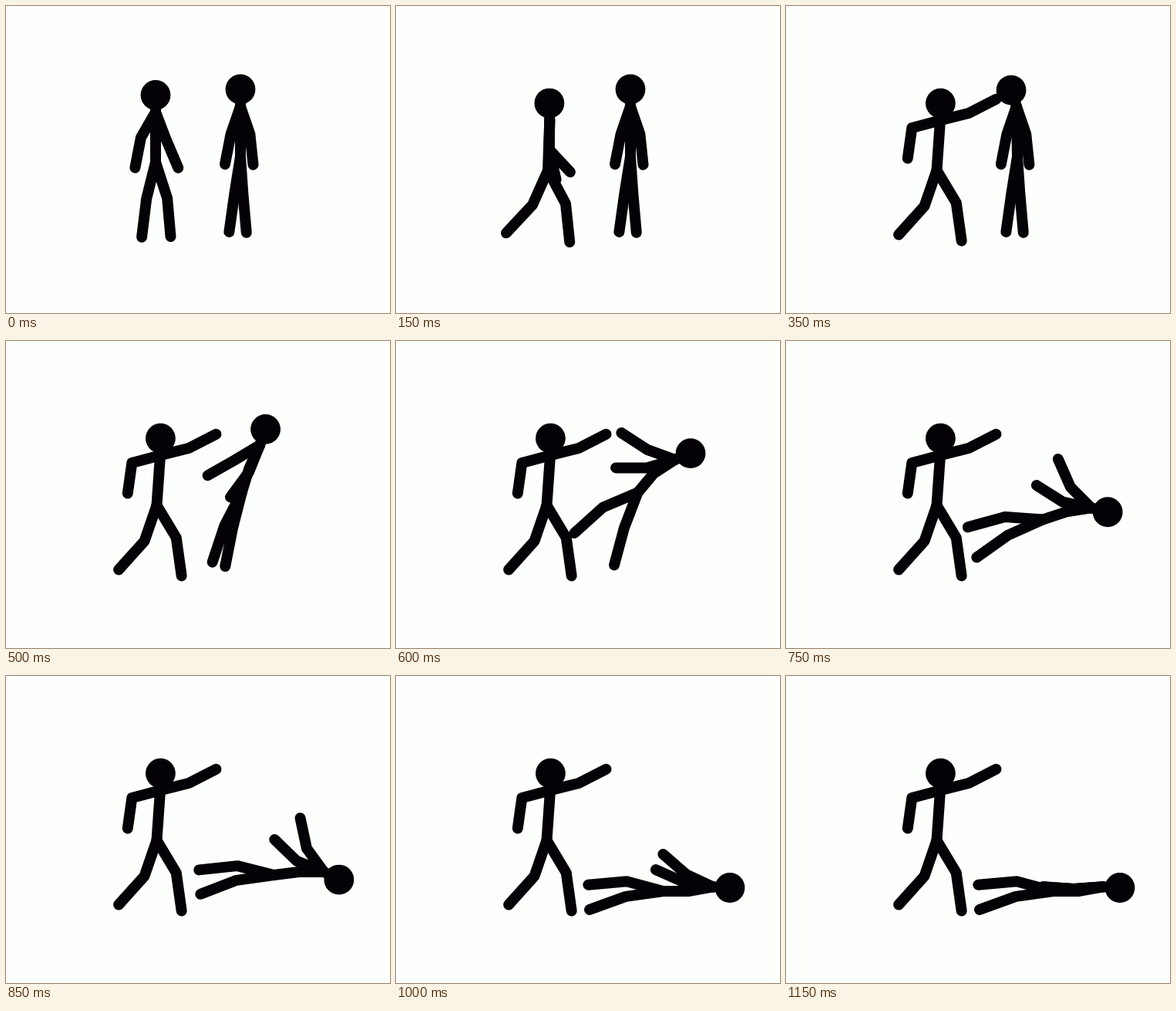
Recreate the animation shown at these times as an HTML page with a canvas. Size 498 by 398 pixels, loop 1200 ms.

```html
<!DOCTYPE html>
<html lang="en">
<head>
<meta charset="utf-8">
<title>Stick fight</title>
<style>
  html, body { margin: 0; width: 100%; height: 100%; overflow: hidden; background: #fdfffc; }
  canvas { display: block; width: 100%; height: 100%; }
</style>
</head>
<body>
<canvas id="stage" width="498" height="398"></canvas>
<script>
const ctx = document.getElementById('stage').getContext('2d');
const PAPER = '#fdfffc', INK = '#040206';
const LOOP = 1200, STEP = 50;
const HEAD = 19.4, LIMB = 14;
const BONES = { spine: [32.5, 32.5, 22], arm: [38, 40], leg: [49, 50] };

// Bone angles are in degrees, clockwise from the right. A key may name only
// some parts; the others keep moving towards their own next key.
const attacker = [
  { t: 0, hip: [194, 202.5], spine: [-90, -90, -90],
    armA: [120, 101], armB: [69, 67], legA: [104, 97], legB: [72, 85] },
  { t: 150, hip: [197, 213], spine: [-88, -88, -91],
    armA: [91, 77], armB: [91, 47], legA: [114, 133], legB: [62, 84] },
  { t: 350, hip: [195.5, 213], spine: [-86, -86, -89],
    armA: [165, 98], armB: [-14, -27], legA: [109, 132], legB: [59, 82] }
];

const idle = { hip: [304, 195], spine: [-90, -90, -90],
  armA: [109, 101], armB: [71, 84], legA: [99, 98], legB: [86, 85] };

const victim = [
  { t: 0, ...idle },
  { t: 300, ...idle },
  { t: 350, ...idle, hip: [300, 195], spine: [-91, -91, -108] },
  // knocked off balance
  { t: 600, ease: 1.6, hip: [313.5, 196.5], spine: [-50, -33, -22],
    armA: [200, 213], armB: [164, 180], legA: [111, 105], legB: [157, 138] },
  // dropping while the body turns flat
  { t: 850, ease: 1.1, hip: [347.5, 258] },
  { t: 850, ease: 0.6, spine: [-7, 0, 27],
    armA: [234, 258], armB: [202, 224], legA: [172, 159], legB: [194, 174] },
  // the body lands first, the arms sink later
  { t: 900, hip: [346.5, 279], spine: [0, -10, 3], legA: [172, 160], legB: [195, 175] },
  { t: 1150, armA: [176, 184], armB: [176, 184] }
];

function valueAt(keys, part, t) {
  const track = keys.filter(key => part in key);
  const next = track.findIndex(key => key.t > t);
  if (next < 0) return track[track.length - 1][part];
  const a = track[next - 1], b = track[next];
  const k = ((t - a.t) / (b.t - a.t)) ** (b.ease || 1);
  return a[part].map((v, i) => v + (b[part][i] - v) * k);
}

// Joint positions along a chain of bones
function chain(from, lengths, angles) {
  const points = [from];
  lengths.forEach((len, i) => {
    const [x, y] = points[i], a = angles[i] * Math.PI / 180;
    points.push([x + len * Math.cos(a), y + len * Math.sin(a)]);
  });
  return points;
}

function stroke(points) {
  ctx.beginPath();
  points.forEach(p => ctx.lineTo(...p));
  ctx.stroke();
}

function drawFigure(keys, t) {
  const at = part => valueAt(keys, part, t);
  const spine = chain(at('hip'), BONES.spine, at('spine'));
  const [hip, , neck, head] = spine;
  stroke(spine);
  for (const side of 'AB') {
    stroke(chain(neck, BONES.arm, at('arm' + side)));
    stroke(chain(hip, BONES.leg, at('leg' + side)));
  }
  ctx.beginPath();
  ctx.arc(...head, HEAD, 0, Math.PI * 2);
  ctx.fill();
}

function draw(t) {
  ctx.fillStyle = PAPER;
  ctx.fillRect(0, 0, 498, 398);
  ctx.fillStyle = ctx.strokeStyle = INK;
  ctx.lineWidth = LIMB;
  ctx.lineCap = ctx.lineJoin = 'round';
  drawFigure(attacker, t);
  drawFigure(victim, t);
}

const start = performance.now();
function tick() {
  const now = (performance.now() - start) % LOOP;
  draw(Math.floor(now / STEP) * STEP);
  requestAnimationFrame(tick);
}
tick();
</script>
</body>
</html>
```
